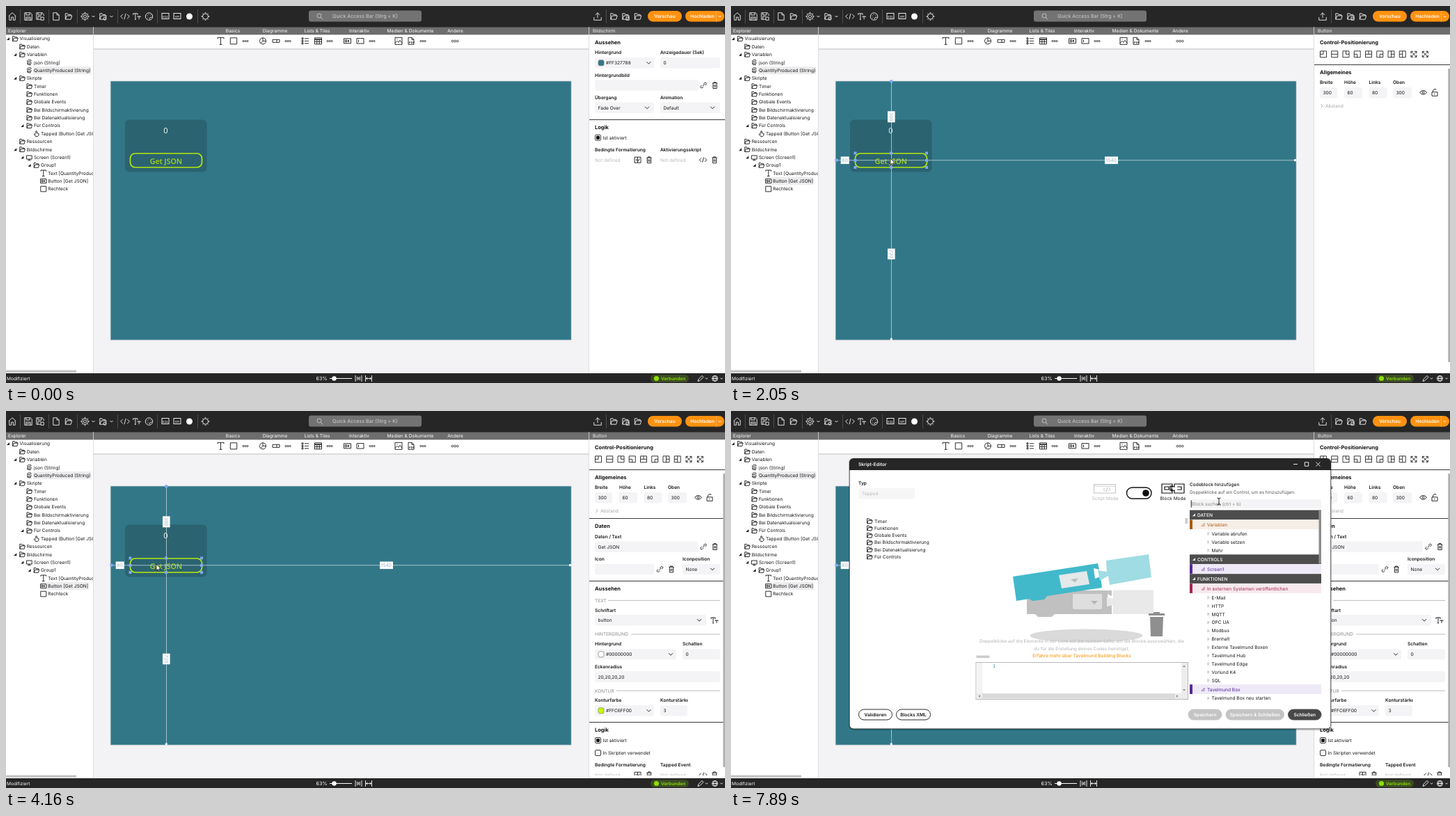
An HTML page that plays this animation: 1033 px wide and 542 px high, repeating every 8000 ms.

```html
<!DOCTYPE html>
<html lang="de">
<head>
<meta charset="utf-8">
<style>
html, body { margin: 0; width: 100%; height: 100%; overflow: hidden; background: #f1f1f3; }
svg { display: block; width: 100vw; height: 100vh; font: 6.6px Inter, sans-serif; text-rendering: geometricPrecision; }
text { white-space: pre; }
</style>
</head>
<body>
<svg id="stage" viewBox="0 0 1033 542"></svg>
<script>
const DARK = '#262626', INK = '#161616', TEAL = '#327788', ORANGE = '#ff9210';

// Icon outlines, centred on 0,0
const folder = 'M-4 4V-4H-1L0-2.5H3.5V-1M-4 4L-2-1H5L3.5 4Z';
const ring = r => `M${-r} 0A${r} ${r} 0 1 0 ${r} 0A${r} ${r} 0 1 0 ${-r} 0`;
const box = (w, h) => `M${-w} ${-h}H${w}V${h}H${-w}Z`;
const icons = {
  folder,
  home: 'M-5-.5L0-5 5-.5M-4-1V5H-1.3V1H1.3V5H4V-1',
  save: 'M-5-5H3L5-3V5H-5ZM-3-5V-2H2V-5M-3 5V1H3V5M-2 3H2',
  saveAs: 'M1 4H-5V-5H3L5-3V-1M-3-5V-2H2V-5M-3 4V0H1M1 1H5V5H1Z',
  doc: 'M-4-5H1L4-2V5H-4ZM1-5V-2H4',
  gear: ring(2) + ring(4.2) + 'M0-6V-4.2M0 6V4.2M-6 0H-4.2M6 0H4.2M-4.2-4.2L-3-3M4.2 4.2L3 3M-4.2 4.2L-3 3M4.2-4.2L3-3',
  folderGear: folder + 'M3 1A2 2 0 1 0 3 5A2 2 0 1 0 3 1',
  folderSave: folder + 'M1 1H5V5H1Z',
  code: 'M-3-3L-6 0-3 3M3-3L6 0 3 3M1-4L-1 4',
  fonts: 'M-5-2V-4H1V-2M-2-4V4M-3 4H-1M1 1V0H5V1M3 0V4',
  palette: ring(5) + 'M-3-1H-2M-1-3H0M2-2H3M-2 2H-1M1 4Q0 1 4 1',
  puzzle: ring(3.8) + 'M-1-5H1M-1 5H1M-5-1V1M5-1V1M-4-3.5L-3-4M4 3.5L3 4M4-3.5L3-4M-4 3.5L-3 4',
  upload: 'M-5 1V5H5V1M0 2V-5M-3-2L0-5 3-2',
  search: 'M-4-1A3 3 0 1 0 2-1A3 3 0 1 0-4-1M1.2 1.2L4 4.5',
  small: 'M-2-1L0 1 2-1',
  chev: 'M-3-1.5L0 1.5 3-1.5',
  right: 'M-1-2.5L1 0-1 2.5',
  text: 'M-4.5-3V-5H4.5V-3M0-5V5M-2 5H2',
  rect: box(4.7, 4.5),
  pie: ring(4.5) + 'M0-4.5V0H4.5M0 0L-3 3.4',
  bar: box(5, 2) + 'M1-2V2',
  list: 'M-1-3.5H5M-1 0H5M-1 3.5H5M-5-4.5H-3V-2.5H-5ZM-5-1H-3V1H-5ZM-5 2.5H-3V4.5H-5Z',
  table: box(5, 4.5) + 'M-5-2.5H5M-5-2H5M-5 1H5M-1.7-2V4.5M1.7-2V4.5',
  button: box(5, 3.5) + 'M-3-1.5V1.5M-3-1.5H-1V1.5H-3M1-1.5V1.5M3-1.5L1 0 3 1.5',
  input: box(5, 3.7) + 'M-2.5-1.8V1.8',
  image: box(5, 5) + 'M-5 3L-2 0 0 2 2-1 5 3M-2.5-2.5H-1.5',
  monitor: box(4.5, 3) + 'M0 3V5M-2.5 5H2.5',
  scroll: 'M3-4H-2Q-4-3-3-1H2Q4 0 3 2H-3M-3 0Q-4 4-1 4H3M3-4V-2',
  hand: 'M-1 0V-4Q0-5 1-4V-1L4 0V3L2 5H-1L-4 1-3 0-1 2',
  link: 'M-1 1L2-2M0-2L2-4Q4-5 5-3L3 0M0 2L-2 4Q-4 5-5 3L-3 0',
  trash: 'M-4-3.5H4M-1.5-3.5V-5H1.5V-3.5M-3-3.5V5H3V-3.5M-1-1V3M1-1V3',
  eye: 'M-5 0Q0-6 5 0Q0 6-5 0' + ring(1.5),
  lock: 'M-4-.5H4V5H-4ZM-2.5-.5V-3Q0-6.5 2.5-4M0 1.5V3',
  rule: box(5, 4.5) + 'M0-4.5V4.5M-3-1H-1M-3 1H-1M1 2L3-2',
  fit: 'M-5-5V5M5-5V5M-2-3V3M2-3V3M0-2V2',
  width: 'M-5-5V5M5-5V5M-4 0H4M-2-2L-4 0-2 2M2-2L4 0 2 2',
  pencil: 'M-4 4L-3 1 2-4 4-2-1 3Z',
  globe: ring(4) + 'M-4 0H4M0-4Q-4 0 0 4Q4 0 0-4',
  expand: 'M-4-1V-4H-1M4-1V-4H1M-4 1V4H-1M4 1V4H1M-4-4L4 4M4-4L-4 4',
  min: 'M-3 0H3', max: box(2.7, 2.7), close: 'M-3-3L3 3M3-3L-3 3'
};

const text = (x, y, s, fill = INK, attr = '') => `<text x="${x}" y="${y}" fill="${fill}" ${attr}>${s}</text>`;
const mid = 'text-anchor="middle" ', bold = 'font-weight="600" ';
const rect = (x, y, w, h, fill, r = 0, attr = '') =>
  `<rect x="${x}" y="${y}" width="${w}" height="${h}" rx="${r}" fill="${fill}" ${attr}/>`;
const path = (d, fill, attr = '') => `<path d="${d}" fill="${fill}" ${attr}/>`;
const line = (d, color, w = 1) => path(d, 'none', `stroke="${color}" stroke-width="${w}"`);
const disc = (x, y, r, fill, attr = '') => `<circle cx="${x}" cy="${y}" r="${r}" fill="${fill}" ${attr}/>`;
const icon = (name, x, y, color = INK, k = 1) =>
  path(icons[name], 'none', `transform="translate(${x} ${y}) scale(${k})" stroke="${color}" stroke-width="${.9 / k}"`);
const iconRow = (items, y, color, k) => items.map(([n, x]) => icon(n, x, y, color, k)).join('');
const group = (id, body, attr = '') => `<g id="${id}" ${attr}>${body}</g>`;
const expander = (x, y, c = INK) => path(`M${x + 2} ${y - 2}v4h-4z`, c);

const toolbar = () => rect(0, 0, 1033, 31, DARK) +
  iconRow([['home', 9], ['save', 32], ['saveAs', 49], ['doc', 72], ['folder', 89.5], ['gear', 113.5], ['folderGear', 139],
    ['code', 171], ['fonts', 188], ['palette', 205.5], ['puzzle', 286.5], ['upload', 850], ['folder', 873],
    ['folderSave', 890], ['folder', 907.5]], 15, '#f2f2f2', 1.05) +
  iconRow([['small', 125.5], ['small', 151.5]], 15, '#fff') +
  [20.5, 61.5, 102.5, 160.5, 217.5, 275.5, 862.5].map(x => line(`M${x} 5V25`, '#4d4d4d')).join('') +
  [[229, 'SQL'], [246, 'API']].map(([x, s]) => rect(x - 5, 10.5, 10, 8, 'none', 0, 'stroke="#fff" stroke-width=".9"') +
    text(x, 16.5, s, '#fff', mid + 'font-size="4.2"')).join('') +
  disc(263.5, 15, 4.5, '#fff') +
  rect(435, 6.5, 162, 16, '#737373', 3) + icon('search', 451, 15, '#c8c8c8') +
  text(469, 17.4, 'Quick Access Bar (Strg + K)', '#d0d0d0', 'font-size="7.1"') +
  rect(922, 7, 49, 15.5, ORANGE, 7.7) + text(946.5, 17.2, 'Vorschau', '#fff', mid + bold) +
  rect(976, 7, 56, 15.5, ORANGE, 7.7) + text(1000.5, 17.2, 'Hochladen', '#fff', mid + bold) +
  line('M1020.5 7V22.5', '#ffb75e', .8) + icon('small', 1025.5, 15, '#fff');

const tree = () => {
  const rows = [[0, 'folder', 'Visualisierung', 1], [1, 'folder', 'Daten'], [1, 'folder', 'Variablen', 1],
    [2, 'scroll', 'json (String)'], [2, 'scroll', 'QuantityProduced (String)'], [1, 'folder', 'Skripte', 1],
    ...['Timer', 'Funktionen', 'Globale Events', 'Bei Bildschirmaktivierung', 'Bei Datenaktualisierung'].map(s => [2, 'folder', s]),
    [2, 'folder', 'Für Controls', 1], [3, 'hand', 'Tapped (Button [Get JSON])'], [1, 'folder', 'Ressourcen'],
    [1, 'folder', 'Bildschirme', 1], [2, 'monitor', 'Screen (Screen1)', 1], [3, 'folder', 'Group1', 1],
    [4, 'text', 'Text [QuantityProduced]'], [4, 'button', 'Button [Get JSON]'], [4, 'rect', 'Rechteck']];
  return rect(0, 41, 125, 487, '#fff') + rect(38.5, 87.2, 84, 11, '#ececee') +
    group('rowMark', rect(59, 246, 59.5, 11, '#ececee')) +
    rows.map(([lv, ic, s, open], i) => {
      const y = 47 + 11.37 * i, x = 10.2 * lv;
      return icon(ic, 13 + x, y, INK, .85) + text(19.5 + x, y + 2.4, s) + (open ? expander(3 + x, y) : '');
    }).join('') + rect(0, 523.5, 101, 3.5, '#c6c6c6');
};

const dots = (x, k = 1) => [-3, 0, 3].map(d => disc(x + d * k, 50.5, 1.1 * k, 'none', 'stroke="#222" stroke-width=".8"')).join('');
const workspace = () => rect(125, 41, 713, 487, '#f3f3f5') +
  rect(126, 61, 711, 2, '#dcdcde') + rect(126, 41, 711, 19.5, '#fff') +
  rect(0, 30.5, 1033, 10.8, '#6e6e6e') + line('M125.5 30V528M837.5 30V528', '#d9d9d9', .8) +
  text(3, 38.3, 'Explorer', '#fff') +
  [[326, 'Basics'], [386.5, 'Diagramme'], [447, 'Lists & Tiles'], [507.5, 'Interaktiv'], [581, 'Medien & Dokumente'], [645.5, 'Andere']]
    .map(([x, s]) => text(x, 38.3, s, '#fff', mid)).join('') +
  iconRow([['text', 308.5], ['rect', 327], ['pie', 369], ['bar', 388], ['list', 430], ['table', 448.5], ['button', 490.5],
    ['input', 509], ['image', 564], ['doc', 582]], 50.3) +
  text(583, 54, 'PDF', INK, mid + bold + 'font-size="4"') +
  [344, 405, 465, 526, 599].map(x => dots(x)).join('') + dots(645, 1.25) +
  rect(149.7, 107.5, 663, 373.5, '#cfd6da', 1) + rect(150.5, 108.3, 661.3, 371.5, TEAL) +
  rect(171, 163.5, 117.5, 75, '#2b6371', 6) +
  text(229.5, 182.8, '0', '#fff', mid + 'font-size="11" font-family="Open Sans, sans-serif"') +
  rect(178.5, 212, 103, 20, 'none', 7, 'stroke="#b4e90e" stroke-width="1.7"') +
  text(230, 226.8, 'Get JSON', '#a9da18', mid + bold + 'font-size="10.6" font-family="Open Sans, sans-serif"');

const tag = (x, y, w, s, turn = 0) => `<g transform="translate(${x} ${y}) rotate(${turn})">` +
  rect(-w / 2, -5.3, w, 10.6, '#fff') + text(0, 2.4, s, '#9fb4c8', mid) + '</g>';
const selection = () => line('M230.5 108V479M151 221.8H811', '#b4cbd2', .9) +
  tag(163.7, 221.8, 12, '80') + tag(546.5, 221.8, 19, '1540') + tag(230.3, 159.3, 16, '300', 90) + tag(230.3, 356.5, 15.5, '720', 90) +
  [178.5, 230, 281].flatMap(x => [211.5, 222, 232].filter(y => x != 230 || y != 222).map(y => [x, y]))
    .concat([[151.5, 221.8], [230.3, 108.3]]).map(([x, y]) => rect(x - 2, y - 2, 4, 4, '#7fa9f5', .5)).join('') +
  rect(809, 220.2, 3, 3, '#fff') + rect(228.8, 477.5, 3, 3, '#fff');

// Property panel parts
const label = (x, y, s) => text(x, y, s, INK, bold);
const head = (y, s) => text(846, y, s, '#111', 'font-weight="700" font-size="7.5"');
const rule = y => line(`M838 ${y}H1033`, '#222', .9);
const field = (x, y, w, s = '', drop = 0, color = '') => rect(x, y, w, 15.5, '#f4f4f6', 3) +
  (color && rect(x + 5, y + 3.8, 8, 8, color, 2, 'stroke="#777" stroke-width=".7"')) +
  text(x + (color ? 16 : 4.5), y + 10.3, s) + (drop ? icon('chev', x + w - drop, y + 7.7) : '');
const check = (y, s, on) => rect(846.5, y - 4, 8, 8, '#fff', 1.5, 'stroke="#222" stroke-width=".9"') +
  (on ? rect(848, y - 2.5, 5, 5, '#111', 1) : '') + text(857.5, y + 2.4, s);
const caption = (y, s, x) => text(846, y, s, '#8c8c8c') + line(`M${x} ${y - 2.4}H1026`, '#b5b5b5', .9);
const logic = (y, s) => label(846, y, 'Bedingte Formatierung') + label(940, y, s) +
  [846, 940].map(x => text(x, y + 14.8, 'Not defined', '#b9b9b9')).join('') +
  iconRow([['rule', 907.5], ['trash', 924], ['code', 1001.5], ['trash', 1018]], y + 12.3, INK, .9);

const screenPanel = () => head(54.5, 'Aussehen') + label(846, 69, 'Hintergrund') + label(940, 69, 'Anzeigedauer (Sek)') +
  field(846, 74, 85, '#FF327788', 7.5, TEAL) + field(940, 74, 86, '0') +
  label(846, 102, 'Hintergrundbild') + field(846, 106.3, 149) + iconRow([['link', 1002], ['trash', 1018.5]], 114, INK, .9) +
  label(846, 134, 'Übergang') + label(940, 134, 'Animation') +
  field(846, 138.5, 85, 'Fade Over', 10) + field(940, 138.5, 86, 'Default', 11) +
  rule(163.5) + head(177, 'Logik') + check(189.2, 'Ist aktiviert', 1) + logic(209, 'Aktivierungsskript');

const positions = ['M-4.5 0H0V-4.5', 'M-4.5 0H4.5', 'M4.5 0H0V-4.5', 'M-4.5 0H0V4.5', 'M-4.5 0H4.5M0 0V-4.5',
  'M4.5 0H0V4.5', 'M0-4.5V4.5M0 0H4.5', 'M0-4.5V4.5M0 0H-4.5'];
const buttonPanel = () => head(54.5, 'Control-Positionierung') +
  positions.map((d, i) => path(box(4.5, 4.5) + d, 'none', `transform="translate(${851 + 16.25 * i} 69.3)" stroke="#222" stroke-width=".9"`)).join('') +
  iconRow([['expand', 981], ['expand', 997.3]], 69.3) + rule(84.5) +
  head(97.5, 'Allgemeines') +
  [[846, 25, 'Breite', 300], [881, 26, 'Höhe', 60], [916.5, 26, 'Links', 80], [951, 27, 'Oben', 300]]
    .map(([x, w, s, v]) => label(x, 112, s) + field(x, 117, w, v)).join('') +
  iconRow([['eye', 994.5], ['lock', 1011]], 124.3) + icon('right', 849, 143.6, '#999') + text(854, 146, 'Abstand', '#a5a5a5') +
  group('details', rule(154.5) + head(168, 'Daten') + label(846, 183, 'Daten / Text') + field(846, 187.5, 148, 'Get JSON') +
    iconRow([['link', 1002], ['trash', 1018.5]], 195, INK, .9) +
    label(846, 215, 'Icon') + label(972, 215, 'Iconposition') + field(846, 219.7, 85) +
    iconRow([['link', 939.5], ['trash', 956]], 227.5, INK, .9) + field(972, 219.7, 54, 'None', 11) + rule(244.5) +
    head(258, 'Aussehen') + caption(274.8, 'TEXT', 865) + label(846, 288.5, 'Schriftart') +
    field(846, 293, 160, 'button', 10) + icon('fonts', 1018, 301) +
    caption(323.4, 'HINTERGRUND', 898) + label(846, 337, 'Hintergrund') + label(972, 337, 'Schatten') +
    field(846, 342, 117, '#00000000', 8, '#fff') + field(972, 342, 54, '0') +
    label(846, 370, 'Eckenradius') + field(846, 374.3, 180, '20,20,20,20') +
    caption(404.6, 'KONTUR', 877) + label(846, 418, 'Konturfarbe') + label(940, 418, 'Konturstärke') + rect(979.5, 411, 46, 10, '#fff') +
    field(846, 423, 85, '#FFC6FF00', 7.5, '#c6ff00') + field(940, 423, 39, '3') + rule(447.5) +
    head(461, 'Logik') + check(473.5, 'Ist aktiviert', 1) + check(491.5, 'In Skripten verwendet') + logic(511, 'Tapped Event')) +
  rect(1030.3, 90, 2.7, 422, '#b0b0b0');

const status = () => rect(0, 528, 1033, 14, DARK) + text(1, 537.6, 'Modifiziert', '#fff') +
  text(445.5, 538, '63%', '#fff', 'font-size="7.2"') + line('M465 535.5H497', '#fff') + disc(471.5, 535.5, 3.2, '#fff') +
  iconRow([['fit', 506.5], ['width', 521]], 535.5, '#fff', .9) +
  rect(926, 530, 55, 11, '#3b4a24', 5.5) + disc(934.5, 535.5, 3.6, '#8be000') + text(941, 538, 'Verbunden', '#8be000', bold) +
  iconRow([['pencil', 998], ['globe', 1018.5]], 535.5, '#fff') + iconRow([['small', 1006.5], ['small', 1028]], 535.5, '#fff', .8);

const picture = () => `<ellipse cx="510.5" cy="323" rx="81" ry="9.5" fill="#dadada"/>` +
  path('M425 258H547V266L541 263V277L547 274V292H465L461 296H441L437 292H425Z', '#c0c0c0') +
  path('M549 257.5H607V292H549V279L540 281V268L549 270Z', '#e9e9e9') +
  rect(491, 263, 42, 22, '#dedede', 2) + path('M517 273h10l-5 5z', '#b5b5b5') +
  path('M405 238L527 219 529 228 521 226 523 241 531 238 533 254 454 266 450 271 433 273 428 270 410 273Z', '#41b9cb') +
  path('M539 215L600 206 604 239 544 250 542 237 530 244 527 229 540 231Z', '#a0dce4') +
  path('M471 236L511 230 515 249 475 255Z', '#e4e8e9') + path('M488 242l11-1.5-4.5 6z', '#b5bdc0') +
  path('M602 296H621L620 324H603ZM600 291H607V289H616V291H623V294H600Z', '#8f8f8f');

const pill = (x, w, s, fill, color, edge = fill) => rect(x, 429, w, 15, fill, 7.5, `stroke="${edge}" stroke-width=".9"`) +
  text(x + w / 2, 438.9, s, color, mid + bold);

const blockList = () => {
  const section = (y, s) => rect(659, y, 189, 13.7, '#4d4d4d') + expander(665, y + 6.8, '#fff') + text(670, y + 9.3, s, '#fff', 'font-weight="500"');
  const kind = (y, s, color, bg) => rect(659, y, 189, 13.7, bg) + rect(659, y, 4, 13.7, color) +
    path(`M680 ${y + 5}v4h-4z`, 'none', `stroke="${color}" stroke-width=".6"`) + text(684, y + 9.3, s, color);
  const items = (y, names) => names.map((s, i) => {
    const cy = y + 11.9 * i;
    return path(`M685 ${cy - 2}l2.2 2-2.2 2z`, 'none', 'stroke="#999" stroke-width=".6"') + text(690.5, cy + 2.4, s);
  }).join('');
  return section(142.5, 'DATEN') + kind(156.3, 'Variablen', '#a85c14', '#f6efe8') +
    items(176.5, ['Variable abrufen', 'Variable setzen', 'Mehr']) +
    section(206.3, 'CONTROLS') + kind(220.2, 'Screen1', '#57279a', '#eee9f7') + section(234.2, 'FUNKTIONEN') +
    kind(248.2, 'In externen Systemen veröffentlichen', '#a3264f', '#f7e9ee') +
    items(268.3, ['E-Mail', 'HTTP', 'MQTT', 'OPC UA', 'Modbus', 'Brenhalt', 'Externe Tavelmund Boxen', 'Tavelmund Hub',
      'Tavelmund Edge', 'Vorlund K4', 'SQL']) +
    kind(393.2, 'Tavelmund Box', '#57279a', '#eee9f7') + items(413, ['Tavelmund Box neu starten']) +
    rect(655, 415.3, 195, 6, '#fff') + '<rect id="thumb" x="844.5" y="142.5" width="3.5" fill="#8d8d8d"/>';
};

const dialog = () => rect(169, 67.5, 694, 391.5, '#000', 7, 'opacity=".25"') + rect(170, 68, 692, 389, DARK, 6) +
  path('M170.6 85H861.4V451Q861.4 456.4 856 456.4H176Q170.6 456.4 170.6 451Z', '#fff') +
  text(183, 78.8, 'Skript-Editor', '#fff', bold) + iconRow([['min', 811], ['max', 827], ['close', 843.5]], 76.5, '#fff') +
  label(183, 105.5, 'Typ') + rect(183, 111, 81, 15.5, '#f6f6f7', 3) + text(188, 121.3, 'Tapped', '#bcbcbc') +
  ['Timer', 'Funktionen', 'Globale Events', 'Bei Bildschirmaktivierung', 'Bei Datenaktualisierung', 'Für Controls']
    .map((s, i) => icon('folder', 199, 158.2 + 10.25 * i, INK, .85) + text(206, 160.6 + 10.25 * i, s)).join('') +
  rect(521.5, 105.5, 31, 12.5, 'none', 0, 'stroke="#c4c4c4"') + line('M521 108H553', '#c4c4c4', .8) +
  icon('code', 540, 113, '#b8b8b8', .8) + text(537.5, 128.2, 'Script Mode', '#b8b8b8', mid) +
  rect(568.5, 110, 35.5, 16, '#fff', 8, 'stroke="#111" stroke-width="1.4"') + disc(596, 118, 4.8, '#111') +
  line('M619 105H634V109L631 108V114L634 113V118H619ZM637 105H651V118H637V114L633 115V108L637 109ZM623 109H629V113H623ZM641 109H647V113H641', '#111', 1.2) +
  text(635, 128.2, 'Block Mode', INK, mid) +
  text(659, 108, 'Codeblock hinzufügen', INK, 'font-weight="500"') +
  text(659, 118.5, 'Doppelklicke auf ein Control, um es hinzuzufügen.', '#555', 'font-size="6.4"') +
  rect(659, 127, 189, 13, '#f4f4f6', 2) + text(662, 136, 'Block suchen (ctrl + b)', '#858585') +
  blockList() + picture() +
  rect(652.5, 154, 3.5, 8, '#cbcbcb') + rect(352.5, 351.5, 19, 3.5, '#cbcbcb') +
  text(504, 333.4, 'Doppelklicke auf die Elemente in der Liste auf der rechten Seite, um die Blöcke auszuwählen, die', '#bdbdbd', mid + 'font-weight="500" font-size="6.4"') +
  text(504, 343.7, 'du für die Erstellung deines Codes benötigst.', '#bdbdbd', mid + 'font-weight="500" font-size="6.4"') +
  text(504, 353.9, 'Erfahre mehr über Tavelmund Building Blocks', '#f59a1c', mid + 'font-weight="500" font-size="6.5"') +
  rect(352, 361.5, 304.5, 53, '#fff', 0, 'stroke="#b0b0b0" stroke-width=".9"') + rect(352.5, 362, 9, 44, '#f3f3f3') +
  rect(647, 362, 9, 52, '#ececec') + rect(352.5, 405.7, 295, 8.3, '#ececec') + rect(361, 406.5, 277, 6.7, '#dadada') +
  path('M358 408v4l-2.5-2zM640 408v4l2.5-2zM649 368h4l-2-2.5zM649 400h4l-2 2.5z', '#888') +
  text(376, 369, '1', '#2b91af', 'font-family="DejaVu Sans Mono, monospace"') +
  pill(183.5, 48, 'Validieren', '#fff', INK, INK) + pill(237.5, 49, 'Blocks XML', '#fff', INK, INK) +
  pill(657, 48, 'Speichern', '#c4c4c4', '#fff') + pill(711, 83.5, 'Speichern & Schließen', '#c4c4c4', '#fff') +
  pill(800.5, 47.5, 'Schließen', '#484848', '#fff') +
  group('caret', line('M661.3 128.5V138.5', '#111', .9));

const $ = id => document.getElementById(id);
$('stage').innerHTML = '<clipPath id="side"><rect x="838" y="41" width="195" height="483"/></clipPath>' +
  toolbar() + tree() + workspace() + group('selection', selection()) +
  rect(838, 41.3, 195, 487, '#fff') + '<text id="title" x="843" y="38.3" fill="#f0f0f0"></text>' +
  group('screenPanel', screenPanel()) + group('buttonPanel', buttonPanel(), 'clip-path="url(#side)"') +
  status() + group('dialog', dialog()) +
  group('pointer', group('click', disc(-1, 0, 7, '#c3cf1c', 'opacity=".78"')) +
    group('arrow', path('M0 0V9.3L2.2 7.4 3.7 10.6 5.1 10 3.7 6.9H6.5Z', '#fff', 'stroke="#111" stroke-width=".8"')) +
    group('beam', line('M-2.5-5Q0-5 0-3.5Q0-5 2.5-5M0-4V4M-2.5 5Q0 5 0 3.5Q0 5 2.5 5', '#111', .9)));

// Pointer path: time, x, y
const route = [[70, 973, 535], [820, 352, 278], [1210, 229, 219], [2400, 229, 219], [2450, 228, 218], [2550, 228, 218],
  [3220, 447, 304], [3320, 447, 304], [3840, 212, 209], [4060, 212, 209], [4160, 216, 220], [6050, 216, 220],
  [6560, 580, 331], [6710, 636, 312], [6880, 652, 291], [7660, 701, 130], [8000, 701, 130]];
const locate = t => {
  const i = Math.max(1, route.findIndex(k => k[0] >= t));
  const [a, b] = [route[i - 1], route[i]], p = (t - a[0]) / (b[0] - a[0]);
  return [a[1] + (b[1] - a[1]) * p, a[2] + (b[2] - a[2]) * p];
};
const show = (id, on) => $(id).style.display = on ? '' : 'none';
const between = (t, a, b) => t >= a && t < b;

function draw() {
  const t = performance.now() % 8000, [x, y] = locate(t), typing = y < 140 && t > 6900;
  const picked = t >= 1910;
  for (const id of ['rowMark', 'selection', 'buttonPanel']) show(id, picked);
  show('screenPanel', !picked);
  show('details', t >= 2450);
  $('title').textContent = t < 2050 ? 'Bildschirm' : 'Button';
  show('dialog', t >= 5700);
  $('thumb').setAttribute('height', t < 5960 ? 101 : 77);
  show('caret', t >= 7820);
  show('click', between(t, 1740, 2050) || between(t, 2450, 2600) || between(t, 7820, 7890));
  show('pointer', t >= 70);
  show('arrow', !typing);
  show('beam', typing);
  $('pointer').setAttribute('transform', `translate(${x} ${y})`);
  requestAnimationFrame(draw);
}
draw();
</script>
</body>
</html>
```
